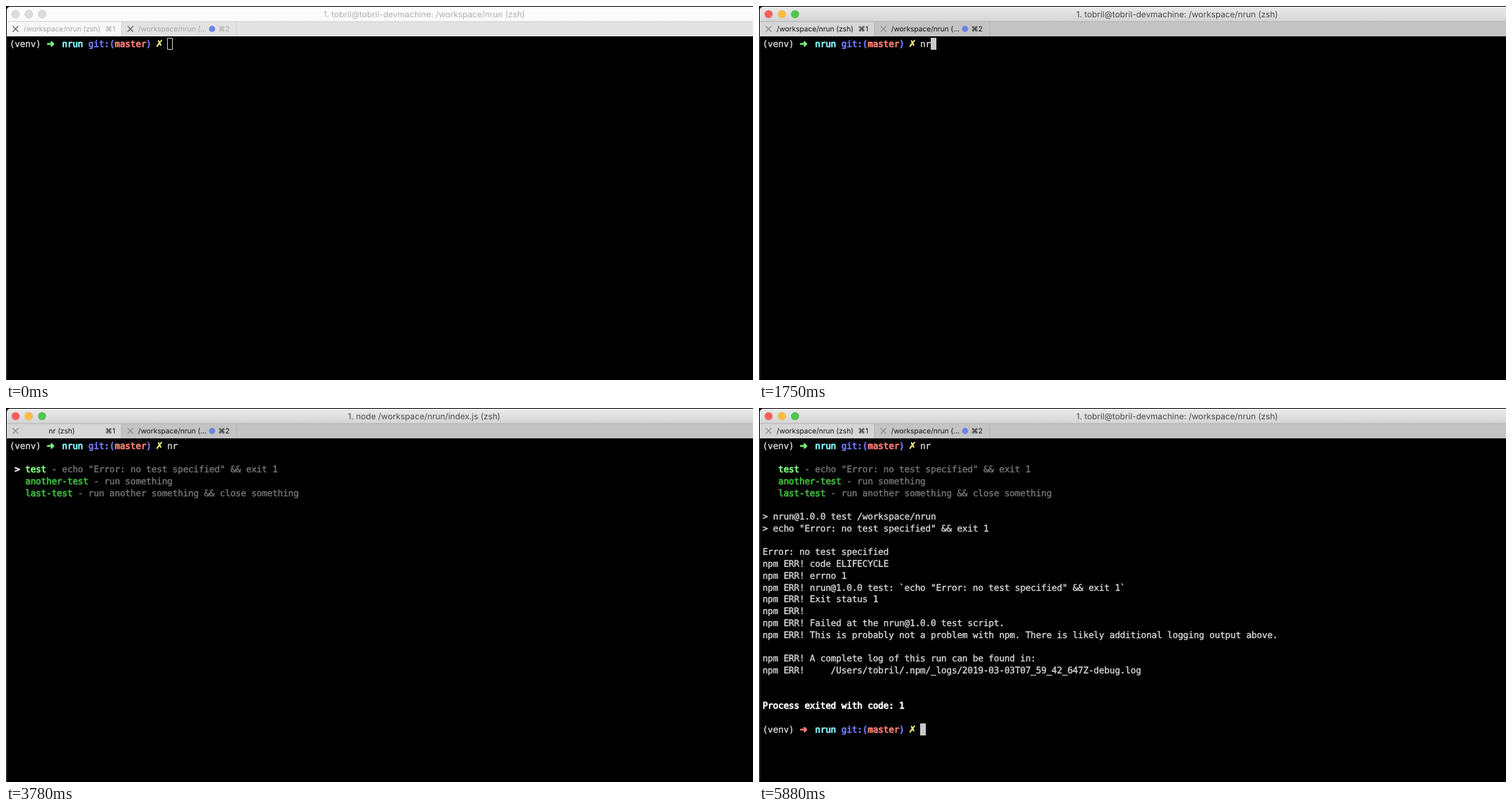
These frames come from a looping animation (1057 by 530 pixels, 5950 ms). An HTML page with a canvas:

```html
<!DOCTYPE html>
<html lang="en">
<head>
<meta charset="utf-8">
<title>nrun terminal demo</title>
<style>
  html, body { margin: 0; width: 100%; height: 100%; overflow: hidden; background: #000; }
  canvas { display: block; }
</style>
</head>
<body>
<canvas id="stage" width="1057" height="530"></canvas>
<script>
const ctx = document.getElementById('stage').getContext('2d');
const LOOP = 5950, STEP = 70;
const COL = 7.44, ROW = 16.74, LEFT = 5;
const MONO = '12.7px "DejaVu Sans Mono", monospace';
const SYMBOL = 'bold 13.5px "DejaVu Sans", sans-serif';
const UI = 'Inter, "DejaVu Sans", sans-serif';
const C = {
  text: '#d8d8d8', white: '#fff', gray: '#787878', green: '#3cb43a', lime: '#80fa80',
  red: '#ff7f76', blue: '#7078f4', cyan: '#86fbff', yellow: '#fffb80'
};

// Times at which the state of the session changes
const AT = {
  enter: 70, click: 420, ringEnd: 630, typeN: 1050, typeR: 1470,
  run: 1820, title: 1890, menu: 2030, down: [2590, 3150, 3570],
  choose: 3850, output: 4410, done: 4690, leave: 5180
};

const shellTitle = '1. tobril@tobril-devmachine: /workspace/nrun (zsh)';
const nodeTitle = '1. node /workspace/nrun/index.js (zsh)';
const scripts = [
  ['test', 'echo "Error: no test specified" && exit 1'],
  ['another-test', 'run something'],
  ['last-test', 'run another something && close something']
];
const output = [
  '> nrun@1.0.0 test /workspace/nrun',
  '> echo "Error: no test specified" && exit 1',
  '',
  'Error: no test specified',
  'npm ERR! code ELIFECYCLE',
  'npm ERR! errno 1',
  'npm ERR! nrun@1.0.0 test: `echo "Error: no test specified" && exit 1`',
  'npm ERR! Exit status 1',
  'npm ERR!',
  'npm ERR! Failed at the nrun@1.0.0 test script.',
  'npm ERR! This is probably not a problem with npm. There is likely additional logging output above.',
  '',
  'npm ERR! A complete log of this run can be found in:',
  'npm ERR!     /Users/tobril/.npm/_logs/2019-03-03T07_59_42_647Z-debug.log'
];

function rect(x, y, w, h, color) {
  ctx.fillStyle = color;
  ctx.fillRect(x, y, w, h);
}

function circle(x, y, r, fill, stroke, width = 1) {
  ctx.beginPath();
  ctx.arc(x, y, r, 0, Math.PI * 2);
  if (fill) { ctx.fillStyle = fill; ctx.fill(); }
  if (stroke) { ctx.strokeStyle = stroke; ctx.lineWidth = width; ctx.stroke(); }
}

function label(text, x, y, size, color, align = 'left') {
  ctx.font = `${size}px ${UI}`;
  ctx.textAlign = align;
  ctx.fillStyle = color;
  ctx.fillText(text, x, y);
}

// Centres every character in its cell; a thin outline gives the weight
function print(row, col, text, color = C.text, bold = false, font = MONO) {
  ctx.font = font;
  ctx.textAlign = 'center';
  ctx.fillStyle = ctx.strokeStyle = color;
  ctx.lineWidth = bold ? 0.8 : 0.35;
  ctx.lineJoin = 'round';
  [...text].forEach((char, i) => {
    const x = LEFT + (col + i + 0.5) * COL, y = 57.8 + row * ROW;
    ctx.fillText(char, x, y);
    ctx.strokeText(char, x, y);
  });
}

function cursor(row, col, solid = true) {
  const x = Math.round(LEFT + col * COL), y = Math.round(45.3 + row * ROW);
  if (solid) return rect(x, y, 8, 17, '#c9c9c9');
  ctx.strokeStyle = '#d0d0d0';
  ctx.lineWidth = 1;
  ctx.strokeRect(x + 0.5, y + 0.5, 7, 16);
}

function prompt(row, arrowColor) {
  print(row, 0, '(venv)');
  print(row, 7.3, '➜', arrowColor, true, SYMBOL);
  print(row, 10, 'nrun', C.cyan, true);
  print(row, 15, 'git:(', C.blue, true);
  print(row, 20, 'master', C.red, true);
  print(row, 26, ')', C.blue, true);
  print(row, 28, '✗', C.yellow, false, SYMBOL);
}

function closeMark(x, color) {
  ctx.strokeStyle = color;
  ctx.lineWidth = 1.2;
  ctx.beginPath();
  ctx.moveTo(x - 4, 28.5); ctx.lineTo(x + 4, 36.5);
  ctx.moveTo(x + 4, 28.5); ctx.lineTo(x - 4, 36.5);
  ctx.stroke();
}

function windowFrame(t) {
  const active = t >= AT.click;
  const bar = ctx.createLinearGradient(0, 1, 0, 22);
  bar.addColorStop(0, active ? '#ebebeb' : '#fefefe');
  bar.addColorStop(1, active ? '#d4d4d4' : '#fafafa');
  rect(0, 0, 1057, 530, '#000');
  rect(0, 43, 1.5, 487, '#3c3c3c');
  ctx.beginPath();
  ctx.roundRect(1, 1, 1062, 40, [5, 0, 0, 0]);
  ctx.fillStyle = bar;
  ctx.fill();
  rect(1, 22, 1056, 21, active ? '#c4c4c4' : '#e2e2e2');
  rect(1, 22, 162, 21, active ? '#d6d6d6' : '#f7f7f7');
  const edge = active ? '#b2b2b2' : '#d3d3d3';
  rect(1, 21.5, 1056, 1, edge);
  rect(163, 22, 1, 21, edge);
  rect(326, 22, 1, 21, edge);

  ['#fb605b', '#fdbd40', '#50c64f'].forEach((color, i) =>
    circle(13.6 + i * 18.7, 11.5, 5.6, active ? color : '#dcdcdc',
      active ? 'rgba(0,0,0,.1)' : '#c9c9c9', 0.8));

  const running = t >= AT.title && t < AT.output;
  label(running ? nodeTitle : shellTitle, 591.7, 16, 11.75, active ? '#4b4b4b' : '#aeaeae', 'center');

  const ink = active ? '#111' : '#a6a6a6', mark = active ? '#8d8d8d' : '#606060';
  closeMark(13.5, mark);
  closeMark(176, mark);
  if (t >= AT.title && t < AT.done) label('nr (zsh)', 79, 36.3, 10.1, ink, 'center');
  else label('/workspace/nrun (zsh)', 25, 36.3, 10.1, ink);
  label('⌘1', 154.5, 36.3, 10.1, ink, 'right');
  label('/workspace/nrun (...', 187, 36.3, 10.1, ink);
  circle(291.6, 32.5, 4.4, '#6c83e6');
  label('⌘2', 316.5, 36.3, 10.1, ink, 'right');
}

function menu(t) {
  const selected = AT.down.filter(time => t >= time).length % scripts.length;
  scripts.forEach(([name, command], i) => {
    const row = i + 2;
    if (i === selected && t < AT.choose) print(row, 1, '>', C.white, true);
    print(row, 3, name, i === selected ? C.lime : C.green, true);
    print(row, 4 + name.length, '- ' + command, C.gray);
  });
}

function session(t) {
  prompt(0, C.lime);
  const typed = 'nr'.slice(0, (t >= AT.typeN) + (t >= AT.typeR));
  print(0, 30, typed);
  if (t < AT.run) return cursor(0, 30 + typed.length, t >= AT.click);
  if (t < AT.menu) return cursor(1, 0);
  menu(t);
  if (t < AT.choose) return;
  if (t < AT.output) return cursor(5, 0);
  output.forEach((line, i) => print(6 + i, 0, line));
  if (t < AT.done) return cursor(20, 0);
  print(22, 0, 'Process exited with code: 1', C.white, true);
  prompt(24, C.red);
  cursor(24, 30);
}

function iBeam(x, y) {
  ctx.lineCap = 'round';
  for (const [color, width] of [['#000', 4.5], ['#e8e8e8', 2.2]]) {
    ctx.strokeStyle = color;
    ctx.lineWidth = width;
    ctx.beginPath();
    for (const side of [-1, 1]) {
      ctx.moveTo(x + side * 7, y - 17);
      ctx.quadraticCurveTo(x, y - 17, x, y - 10);
      ctx.lineTo(x, y + 10);
      ctx.quadraticCurveTo(x, y + 17, x + side * 7, y + 17);
    }
    ctx.moveTo(x - 2, y + 1);
    ctx.lineTo(x + 2, y + 1);
    ctx.stroke();
  }
  ctx.lineCap = 'butt';
}

function pointer(t) {
  if (t >= AT.click && t < AT.ringEnd) {
    circle(523, 352.5, 34.3, null, '#f0f0f0', 1.2);
    circle(523, 352.5, 30.8, null, '#f0f0f0', 1.2);
  }
  const arriving = t >= AT.enter && t < AT.typeN;
  if (!arriving && t < AT.leave) return;
  // 0 is below the window, 1 is the resting place
  const p = arriving
    ? Math.min(1, (t - AT.enter) / (AT.click - AT.enter))
    : 1 - (t - AT.leave) / (LOOP - STEP - AT.leave);
  const eased = p * p * (3 - 2 * p);
  iBeam(540 - 13 * eased, 552 - 189 * eased);
}

function frame(now) {
  const t = Math.floor((now % LOOP) / STEP) * STEP;
  ctx.textRendering = 'geometricPrecision';
  windowFrame(t);
  session(t);
  pointer(t);
  requestAnimationFrame(frame);
}
requestAnimationFrame(frame);
</script>
</body>
</html>
```
